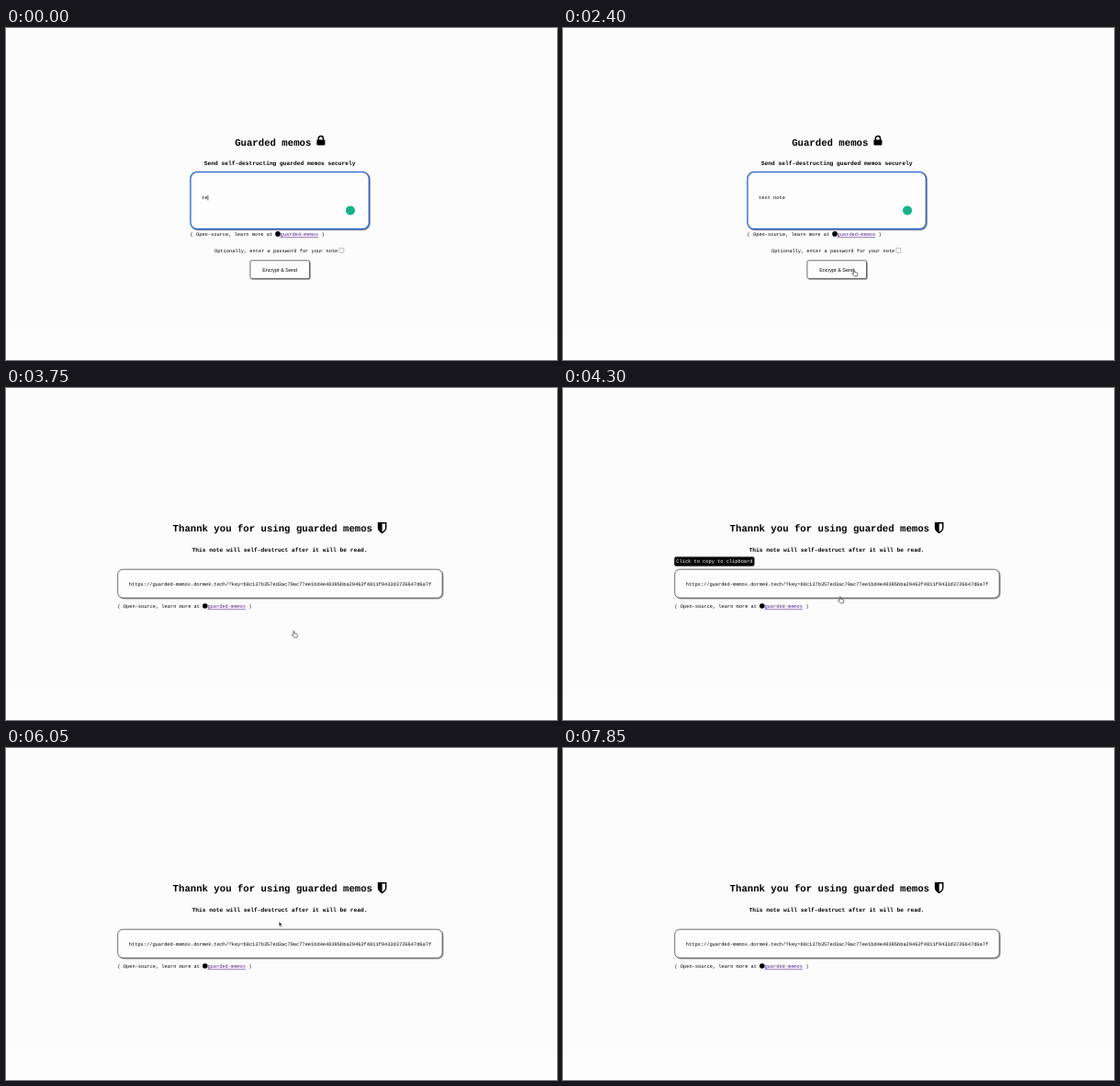
An HTML page for the animation above (8000 ms loop, 600 px wide and 361 px high).

```html
<!DOCTYPE html>
<html lang="en">
<head>
<meta charset="utf-8">
<title>Guarded memos</title>
<style>
  html, body { margin: 0; width: 100%; height: 100%; overflow: hidden; background: #fcfcfc; }
  svg { display: block; width: 100%; height: 100%; }
  text { font: 5.333px "Liberation Mono", monospace; text-rendering: geometricPrecision; white-space: pre; }
  .title { font-size: 10.667px; font-weight: bold; }
  .subtitle { font-size: 6.24px; font-weight: bold; }
  .button { font-family: "Liberation Sans", sans-serif; font-size: 5.45px; }
  .link { fill: #551a8b; text-decoration: underline; }
  .panel { fill: #fdfdfd; stroke: #333; stroke-width: .7; filter: drop-shadow(1px 1px .7px #999); }
  .cursor { fill: #fff; stroke: #222; stroke-width: .6; stroke-linejoin: round; }
</style>
</head>
<body>
<svg viewBox="0 0 600 361">
  <defs>
    <g id="footer">
      <text>( Open-source, learn more at </text>
      <circle cx="95.4" cy="-2.3" r="2.8"/>
      <text class="link" x="98">guarded-memos</text>
      <text x="142.8">)</text>
    </g>
  </defs>
  <rect y="332" width="600" height="29" fill="#fdfdfd"/>

  <g id="compose">
    <text class="title" x="249.2" y="127.7">Guarded memos</text>
    <rect x="338.4" y="121.6" width="9" height="5.9" rx="1"/>
    <path d="M340.3 122v-1.8a2.6 2.6 0 0 1 5.2 0v1.8" fill="none" stroke="#000" stroke-width="1.5"/>
    <text class="subtitle" x="215.8" y="148.9">Send self-destructing guarded memos securely</text>
    <rect id="area" class="panel" x="200.9" y="156.7" width="194.4" height="61.8" rx="7"/>
    <text id="note" x="213.1" y="186.2"></text>
    <path id="caret" d="M0 181.8v5.6" stroke="#000" stroke-width=".6"/>
    <circle id="badge" cx="375" cy="198.4" r="5" fill="#15b38a"/>
    <use href="#footer" x="200.6" y="226.2"/>
    <text x="227" y="244.2">Optionally, enter a password for your note</text>
    <rect x="362.8" y="239.3" width="5" height="5" rx=".9" fill="#fff" stroke="#777" stroke-width=".5"/>
    <rect class="panel" x="265.9" y="252.8" width="64.6" height="19.6" rx="1.7"/>
    <text class="button" x="279.2" y="264.6">Encrypt &amp; Send</text>
  </g>

  <g id="result">
    <text class="title" x="181.6" y="156.4">Thannk you for using guarded memos</text>
    <path d="M404.8 146.1h9.6v6c0 2.7-2.2 4.8-4.8 6.1c-2.6-1.3-4.8-3.4-4.8-6.1z"/>
    <path d="M409.6 147.6h3.3v4.6c0 1.8-1.5 3.2-3.3 4.2z" fill="#fcfcfc"/>
    <text class="subtitle" x="202.6" y="178">This note will self-destruct after it will be read.</text>
    <rect id="linkBox" class="panel" x="121.7" y="197.2" width="353.4" height="31" rx="5.5"/>
    <text x="133.8" y="214.5">https://guarded-memos.dormek.tech/?key=b8c137b357ed3ac79ac77ee1bd4e40395bba29462f4811f9433d3726647d6a7f</text>
    <use href="#footer" x="121.4" y="239.3"/>
    <g id="tooltip">
      <rect x="121.2" y="183.4" width="87.3" height="10.4" rx="2" fill="#0a0a0a"/>
      <text x="123.3" y="190.2" fill="#fff">Click to copy to clipboard</text>
    </g>
  </g>

  <g id="pointer">
    <path id="hand" class="cursor" d="M-.6.5Q0-.4.6.5V2.8L3.2 3.3Q4 3.6 3.9 4.6L3.4 7.2H0L-2 4.7Q-2.1 3.6-1.2 4L-.6 4.5Z"/>
    <path id="arrow" class="cursor" d="M0 0V5.6L1.3 4.5L2.2 6.5L3.1 6.1L2.2 4.1H3.9Z" style="fill:#111;stroke:#fff"/>
    <path id="beam" d="M-1-3H1M0-3V3M-1 3H1" fill="none" stroke="#222" stroke-width=".6"/>
  </g>
</svg>
<script>
const LOOP = 8000;
const NOTE = "test note";
const KEY_TIMES = [0, 0, 100, 250, 850, 1150, 1300, 1450, 1600];
const POINTER_PATH = [
  [1700, 310, 195], [2350, 317, 262.7], [2550, 317, 262.7], [3150, 313.5, 264],
  [3800, 313.5, 264], [4500, 299, 217.5], [5950, 299, 217.5], [6400, 285, -8]
];
const el = Object.fromEntries([...document.querySelectorAll("[id]")].map(node => [node.id, node]));

const clamp = v => Math.min(1, Math.max(0, v));
const progress = (t, from, to) => clamp((t - from) / (to - from));
const smooth = p => p * p * (3 - 2 * p);
const show = (node, visible) => node.style.display = visible ? "" : "none";
const mix = (a, b, p) => `rgb(${a.map((v, i) => v + (b[i] - v) * p)})`;

function pointerAt(t) {
  const next = POINTER_PATH.findIndex(key => key[0] > t);
  if (next < 1) return null;
  const [t0, x0, y0] = POINTER_PATH[next - 1];
  const [t1, x1, y1] = POINTER_PATH[next];
  const p = smooth(progress(t, t0, t1));
  return [x0 + (x1 - x0) * p, y0 + (y1 - y0) * p];
}

function draw(t) {
  const composing = t < 3700;
  show(el.compose, composing);
  show(el.result, !composing);

  const typed = KEY_TIMES.filter(time => time <= t).length;
  el.note.textContent = NOTE.slice(0, typed);
  el.caret.setAttribute("transform", `translate(${213.5 + typed * 3.2})`);
  const idle = t - KEY_TIMES[typed - 1];
  show(el.caret, t < 2550 && idle % 1000 < 550);

  // The text area loses focus after the button click.
  const blur = smooth(progress(t, 2550, 2900));
  el.area.style.stroke = mix([38, 98, 205], [51, 51, 51], blur);
  el.area.style.strokeWidth = 1.3 - .6 * blur;
  show(el.badge, t < 2700);

  const flash = Math.min(progress(t, 5120, 5200), 1 - progress(t, 5250, 5400));
  const glow = mix([153, 153, 153], [65, 165, 180], flash);
  const offset = 1 + .4 * flash;
  el.linkBox.style.filter = `drop-shadow(${offset}px ${offset}px .7px ${glow})`;

  const pos = pointerAt(t);
  show(el.pointer, pos);
  const y = pos ? pos[1] : 0;
  const overBox = !composing && y > 197 && y < 228;
  show(el.tooltip, overBox);
  if (!pos) return;
  el.pointer.setAttribute("transform", `translate(${pos})`);
  const hand = overBox || (composing ? y > 252 : t < 3850);
  const beam = composing && y < 219;
  show(el.hand, hand);
  show(el.beam, beam);
  show(el.arrow, !hand && !beam);
}

function tick() {
  draw(performance.now() % LOOP);
  requestAnimationFrame(tick);
}
tick();
</script>
</body>
</html>
```
